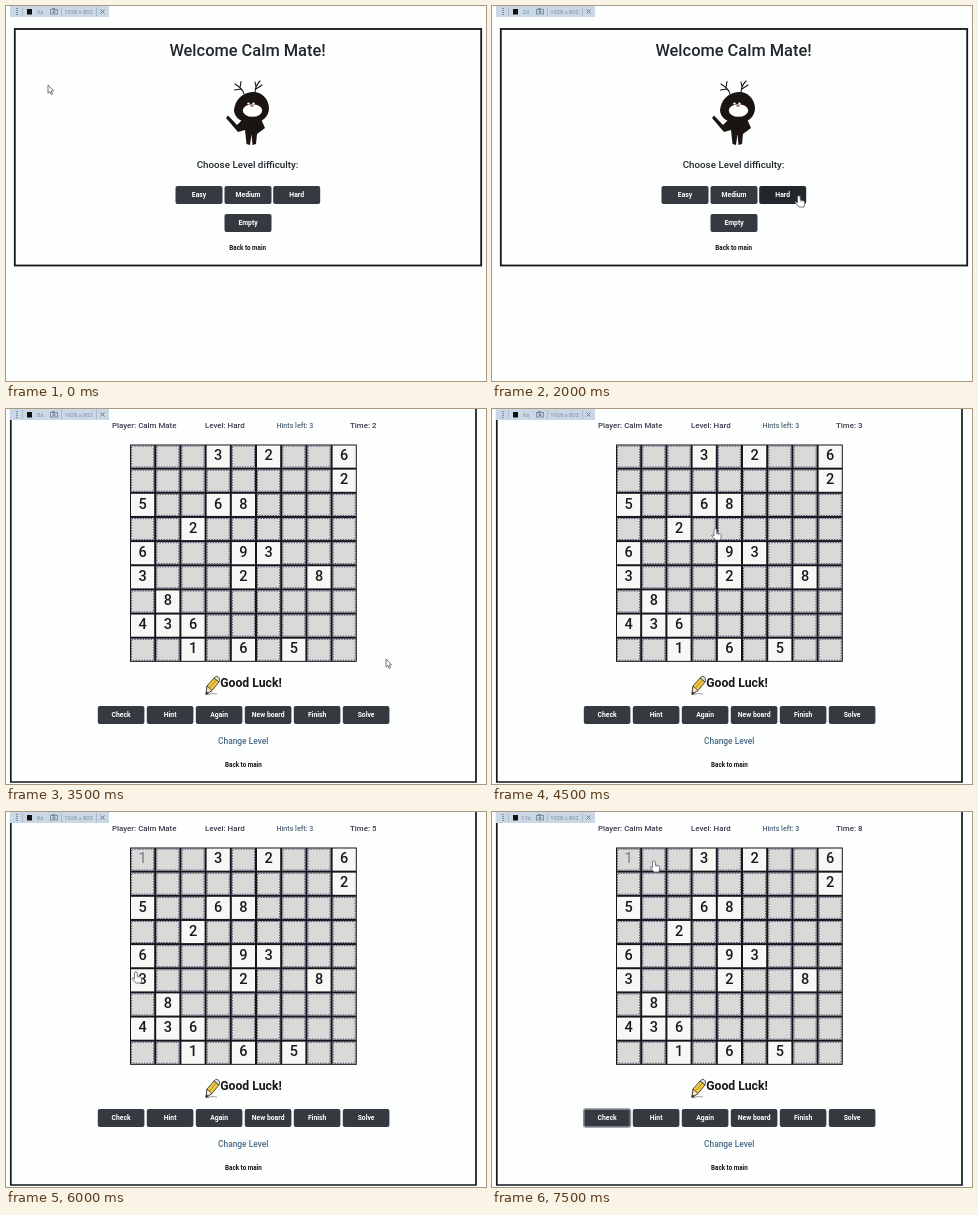
An HTML page with a canvas for the animation above (8 s loop, 480x375 px).

```html
<!DOCTYPE html>
<html lang="en">
<head>
<meta charset="utf-8">
<title>Sudoku</title>
<style>
html, body { margin: 0; width: 100%; height: 100%; overflow: hidden; background: #fdfefe; }
canvas { display: block; width: 480px; height: 375px; }
</style>
</head>
<body>
<canvas id="stage"></canvas>
<script>
const W = 480, H = 375, LOOP = 8000, STEP = 500;
const FONT = 'Roboto, "Liberation Sans", sans-serif';
const PLAYER = 'Calm Mate';
const DARK = '#343a40', HOVER = '#23272b', INK = '#14161a';

const canvas = document.getElementById('stage');
const ratio = window.devicePixelRatio || 1;
canvas.width = W * ratio;
canvas.height = H * ratio;
const c = canvas.getContext('2d');
c.scale(ratio, ratio);

const CLUES = ['...3.2..6'.replace('3.2', '3.2'), '........2', '5..68....', '..2......',
  '6...93...', '3...2..8.', '.8.......', '436......', '..1.6.5..'];
CLUES[0] = '...3.2..6';

// Pointer stops: time, x, y
const PATH = [[0, 42, 79], [500, 96, 98], [1500, 255, 160], [2000, 307, 190], [2500, 302, 194],
  [3000, 344, 224], [3500, 380, 250], [4000, 310, 192], [5000, 137, 48], [5500, 137, 48],
  [6000, 130, 160], [6500, 121, 301], [7000, 121, 301], [7500, 162, 49], [8000, 162, 49]];
const CLOCK = [0, 0, 0, 0, 0, 11, 1, 2, 3, 3, 4, 5, 5, 6, 7, 8];
const RECORD = [0, 0, 1, 1, 2, 4, 4, 5, 5, 6, 6, 7, 8, 10, 10, 11];

function pointerAt(t) {
  const i = Math.max(1, PATH.findIndex(p => p[0] > t));
  const a = PATH[i - 1], b = PATH[i];
  const k = (t - a[0]) / (b[0] - a[0]);
  return [a[1] + (b[1] - a[1]) * k, a[2] + (b[2] - a[2]) * k];
}

function text(str, x, y, size, color = INK, weight = 500, align = 'center') {
  c.font = `${weight} ${size}px ${FONT}`;
  c.fillStyle = color;
  c.textAlign = align;
  c.textBaseline = 'alphabetic';
  c.fillText(str, x, y);
}

function rect(x, y, w, h, color) {
  c.fillStyle = color;
  c.fillRect(x, y, w, h);
}

function line(points, color, width) {
  c.beginPath();
  points.forEach(([x, y], i) => i ? c.lineTo(x, y) : c.moveTo(x, y));
  c.strokeStyle = color;
  c.lineWidth = width;
  c.stroke();
}

function shape(path, fill, stroke, width = 1) {
  const p = new Path2D(path);
  if (fill) { c.fillStyle = fill; c.fill(p); }
  if (stroke) { c.strokeStyle = stroke; c.lineWidth = width; c.stroke(p); }
}

function oval(x, y, rx, ry, color) {
  c.beginPath();
  c.ellipse(x, y, rx, ry, 0, 0, 7);
  c.fillStyle = color;
  c.fill();
}

function button(label, x, y, w, color = DARK, focus = false) {
  c.beginPath();
  c.roundRect(x, y, w, 18, 2);
  c.fillStyle = color;
  c.fill();
  if (focus) {
    c.strokeStyle = '#8b9197';
    c.lineWidth = 1.6;
    c.stroke();
  }
  text(label, x + w / 2, y + 11.4, 6.8, '#fff', 700);
}

function toolbar(n) {
  const tint = '#7d8fa0';
  rect(4, 0, 99, 11, '#c9d8e4');
  for (let y = 2; y < 10; y += 2) rect(10, y, 2, 1, tint);
  for (const x of [16, 55, 90]) rect(x, 1, 0.8, 9, '#a6b5c2');
  rect(21, 3, 5, 5.5, '#111');
  text(RECORD[n] + 's', 34, 8, 6, tint, 400);
  c.strokeStyle = tint;
  c.lineWidth = 1;
  c.strokeRect(44.5, 3.5, 7, 4.5);
  rect(46, 2, 3, 1.5, tint);
  oval(48, 5.7, 1.5, 1.5, tint);
  text('1928 x 802', 72.5, 7.9, 5.8, tint, 400);
  line([[94.5, 3.5], [98.5, 7.5]], '#5d6b78', 0.9);
  line([[98.5, 3.5], [94.5, 7.5]], '#5d6b78', 0.9);
}

function deer() {
  const fur = '#1b1511';
  c.lineCap = c.lineJoin = 'round';
  shape('M238 88 Q237 83 229 78 M234 82 L235 75.5 M235 83 L228.5 84', null, fur, 1.1);
  shape('M249 87 Q249 80 254 75 M250 81 L249 76 M250 83 L256 79', null, fur, 1.1);
  shape('M246 86 C255 85 263 93 263 102 C263 110 257 117 246 117 C235 117 228 111 228 104 C229 95 235 87 246 86Z', fur);
  shape('M237 113 L255 113 L259 122 L251 128 L250 138 L246.5 139 L245.5 128 L244 139 L240.5 138 L239 124 L232 126 L220 112 L222 109.5 L231 119Z', fur);
  oval(246.5, 104.5, 9.7, 6.3, '#fff');
  oval(242.5, 97.5, 1.3, 1.1, '#fff');
  oval(247.5, 97.5, 1.3, 1.1, '#fff');
  oval(246, 99.8, 1.7, 0.9, '#8d5148');
  c.lineCap = 'butt';
  c.lineJoin = 'miter';
}

function menu(t) {
  c.strokeStyle = INK;
  c.lineWidth = 1.8;
  c.strokeRect(8.8, 23, 466.4, 236.5);
  text(`Welcome ${PLAYER}!`, 241.5, 50.3, 16.4, '#22262b');
  deer();
  text('Choose Level difficulty:', 241.5, 161.7, 9.8, '#22262b');
  button('Easy', 169.5, 180, 47);
  button('Medium', 218.5, 180, 47);
  button('Hard', 267.2, 180, 47, t >= 2000 ? HOVER : DARK);
  button('Empty', 218.5, 208, 47);
  text('Back to main', 241.7, 244.3, 6.3, INK, 700);
}

function board(typed) {
  const left = 124, top = 35.5, cw = 25.2, ch = 24.15;
  rect(left, top, cw * 9, ch * 9, '#15151d');
  for (let r = 0; r < 9; r++) {
    for (let k = 0; k < 9; k++) {
      const x = left + k * cw, y = top + r * ch, digit = CLUES[r][k];
      const given = digit !== '.';
      rect(x + 1, y + 1, cw - 2, ch - 2, given ? '#f7f8f5' : '#d9dad8');
      if (!given) {
        c.setLineDash([1.5, 1.2]);
        c.strokeStyle = '#55516f';
        c.lineWidth = 1;
        c.strokeRect(x + 1.6, y + 1.6, cw - 3.2, ch - 3.2);
        c.setLineDash([]);
      }
      if (given) text(digit, x + cw / 2, y + 15.7, 14.5, '#181a20');
    }
  }
  if (typed) text('1', left + cw / 2, top + 15.7, 14.5, '#77758f', 400);
}

function pencil() {
  c.lineJoin = 'round';
  shape('M200 285.5 L201 277 L208 269 L213 273 L206 281.5Z', '#efc843', '#3c3830', 0.9);
  shape('M208 269 Q211 265.5 213.3 269 Q214 271.5 213 273Z', '#d9dadd', '#3c3830', 0.8);
  shape('M201 277 L206 281.5 L200 285.5Z', '#f5e6c5', '#3c3830', 0.8);
  shape('M200 285.5 L200.4 282.5 L202.6 284Z', '#222');
  line([[203.4, 279], [210.4, 271]], '#8e7431', 0.7);
  shape('M201 286 Q206 283.5 211 285', null, '#777', 0.7);
  c.lineJoin = 'miter';
}

function game(t, n) {
  line([[4.8, 0], [4.8, 373], [470, 373], [470, 0]], INK, 1.7);
  text(`Player: ${PLAYER}`, 106, 18.8, 7.9, '#3b3b4d', 500, 'left');
  text('Level: Hard', 199, 18.8, 7.9, '#3b3b4d', 500, 'left');
  text('Hints left: 3', 270.5, 18.6, 7.1, '#4f6478', 500, 'left');
  text('Time: ' + CLOCK[n], 344, 18.8, 7.9, '#3b3b4d', 500, 'left');
  board(t >= 5500);
  pencil();
  text('Good Luck!', 245, 277.8, 12.2, INK, 700);
  ['Check', 'Hint', 'Again', 'New board', 'Finish', 'Solve'].forEach((label, i) => {
    const over = i === 0 && t >= 6500 && t < 7500;
    button(label, 91.8 + i * 49, 297, 46.6, over ? HOVER : DARK, i === 0 && t >= 7000);
  });
  text('Change Level', 237.2, 335, 8.4, '#486b85');
  text('Back to main', 237.4, 358.2, 6.3, INK, 700);
}

function pointer(t) {
  const [x, y] = pointerAt(t);
  const hand = t === 2000 || t === 2500 || t >= 4500;
  c.save();
  c.translate(x, y);
  c.lineJoin = 'round';
  if (hand) {
    shape('M-1.5 0.5 Q0 -1 1.2 0.5 L1.3 4 L4.8 5 Q6 5.4 5.8 7 L5 11 L0 11 L-4 6.5 Q-3.8 5 -1.5 6.8Z', '#fff', '#555b61', 0.8);
    line([[1.3, 4], [1.3, 6]], '#777', 0.5);
    line([[3, 4.6], [3, 6.4]], '#777', 0.5);
  } else {
    shape('M0 0 L0 8.2 L1.9 6.5 L3.2 9.4 L4.5 8.8 L3.2 6 L5.6 5.8Z', '#fff', '#4d5257', 0.8);
  }
  c.restore();
}

function draw(now) {
  const n = Math.floor((now % LOOP) / STEP), t = n * STEP;
  rect(0, 0, W, H, '#fdfefe');
  if (t < 2500) menu(t); else game(t, n);
  toolbar(n);
  pointer(t);
}

const start = performance.now();
function tick(now) {
  draw(Math.max(0, now - start));
  requestAnimationFrame(tick);
}
draw(0);
requestAnimationFrame(tick);
</script>
</body>
</html>
```
